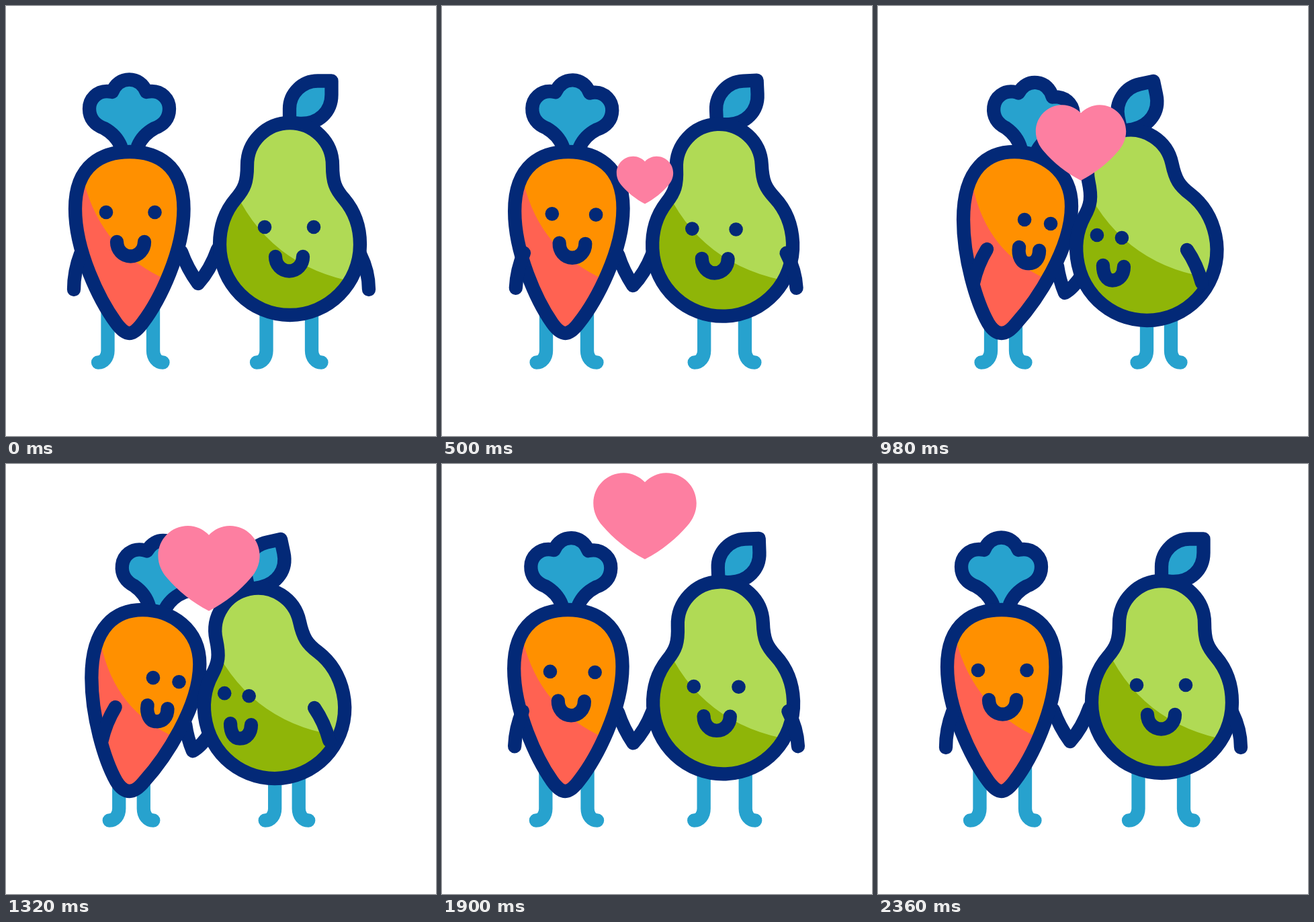
Write an HTML page with a canvas that moves like this. It is 640 by 640 pixels and loops after 2400 ms.

```html
<!DOCTYPE html>
<html lang="en">
<head>
<meta charset="utf-8">
<title>Carrot and pear</title>
<style>
  html, body { margin: 0; height: 100%; overflow: hidden; background: #fff; }
  canvas { display: block; width: 100vw; height: 100vh; }
</style>
</head>
<body>
<canvas width="640" height="640"></canvas>
<script>
const ctx = document.querySelector('canvas').getContext('2d');
const LOOP = 2400;
const NAVY = '#032977', BLUE = '#27a2ce', PINK = '#fd7fa1';
const ORANGE = '#ff9000', RED = '#ff6252', LIME = '#b0da55', GREEN = '#8fb508';

const CARROT = [
  'M184 217C223 217 264.5 235 264.5 302C264.5 365 229 438 203 472Q192 487 183.5 487Q175 487 164 472C139 438 103 365 103 302C103 235 145 217 184 217Z',
  'M203 217C245 217 288 245 288 298C288 362 235 440 206 472Q194 487 184 487Q173 487 164 472C146 440 127 375 127 318C127 240 165 217 203 217Z'];
const CARROT_SHADE = [
  'M116 262Q143 365 240 408L240 520L60 520L60 262Z',
  'M141 268Q162 368 252 407L252 520L60 520L60 268Z'];
const CARROT_MOUTH = [
  'M165 351C165 363 174 372.5 185.5 372.5C197 372.5 206 363 206 351',
  'M210 359C208 371 213 383 223 383C233 384 240 376 240 364'];
const CARROT_ARM = ['M111 369Q101 395 101 422', 'M162 362Q148 385 142 412'];
const CARROT_LEAF = 'M171 209C166 197 157 188 146 182C132 177 124 167 124 153C124 138 136 127 150 127Q154 127 158 128C163 116 172 109.5 183.5 109.5C195 109.5 204 116 209 128Q213 127 217 127C231 127 243 138 243 153C243 167 235 177 221 182C210 188 201 197 196 209';

// The pear is drawn around the centre of its belly.
const PEAR = 'M0 -181C35 -181 63.5 -153 63.5 -118C63.5 -93 67.5 -83 80.5 -68C97.5 -48 104.5 -25 104.5 0C104.5 58 57.5 105 0 105C-57.5 105 -104.5 58 -104.5 0C-104.5 -25 -97.5 -48 -80.5 -68C-67.5 -83 -63.5 -93 -63.5 -118C-63.5 -153 -35 -181 0 -181Z';
const PEAR_LEAF = 'M-.5 -180V-202C-.5 -225 18.5 -243.5 41.5 -243.5H62V-223C62 -197 42.5 -180 17.5 -180Z';
const PEAR_SHADE = 'M-87.5 -93Q-35.5 33 102.5 57V165H-142.5V-93Z';
const PEAR_MOUTH = [
  'M401 373C401 385 410 394.5 421.5 394.5C433 394.5 442 385 442 373',
  'M335 386C335 399 340 408.5 349 408.5C359 408.5 366 400 366 388'];
const PEAR_ARM = ['M527 369Q540 395 540 422', 'M460 363Q475 385 482 412'];

const HANDS = [
  'M261 366Q270 391 286 413Q304 393 315 362',
  'M267 387Q270 408 278 427Q291 420 305 398'];
const HEART = 'M0 -52.5C-8 -61 -20 -67 -33 -67C-59 -67 -80 -46 -80 -20C-80 -6 -74 6 -66 15C-50 34 -26 54 0 67C26 54 50 34 66 15C74 6 80 -6 80 -20C80 -46 59 -67 33 -67C20 -67 8 -61 0 -52.5Z';

// cubic-bezier(.8, 0, .2, 1)
function ease(x) {
  if (x <= 0) return 0;
  if (x >= 1) return 1;
  let low = 0, high = 1, s;
  for (let i = 0; i < 24; i++) {
    s = (low + high) / 2;
    const q = 1 - s;
    if (2.4 * s * q * q + 0.6 * s * s * q + s ** 3 < x) low = s; else high = s;
  }
  return s * s * (3 - 2 * s);
}

function morph([from, to], k) {
  const number = /-?[\d.]+/g, ends = to.match(number);
  let i = 0;
  return new Path2D(from.replace(number, v => +v + (ends[i++] - v) * k));
}

function place(d, x, y, degrees = 0, scale = 1) {
  const path = new Path2D();
  path.addPath(new Path2D(d), new DOMMatrix().translate(x, y).rotate(degrees).scale(scale));
  return path;
}

function fill(path, color) {
  ctx.fillStyle = color;
  ctx.fill(path);
}

function line(path, color = NAVY) {
  ctx.strokeStyle = color;
  ctx.stroke(path);
}

function leg(x, side) {
  line(new Path2D(`M${x} 440V513C${x} 523 ${x + side * 6} 530.5 ${x + side * 14.5} 530.5`), BLUE);
}

function leaf(path) {
  fill(path, BLUE);
  line(path);
}

function body(path, light, dark, shade) {
  fill(path, light);
  ctx.save();
  ctx.clip(path);
  fill(shade, dark);
  ctx.restore();
  line(path);
}

function eye(x, y) {
  const dot = new Path2D();
  dot.arc(x, y, 10.3, 0, Math.PI * 2);
  fill(dot, NAVY);
}

function drawHeart(t) {
  const scale = 0.84 * ease((t - 290) / 400) + 0.16 * ease((t - 1000) / 600) - ease((t - 1760) / 600);
  if (scale <= 0.004) return;
  const u = (t - 280) / 2080;
  const y = 280.5 - 250 * u + 8.4 * Math.sin(2 * Math.PI * u);
  fill(place(HEART, 302, y, 0, scale), PINK);
}

function draw(t) {
  const k = 1.022 * ease(1 - Math.abs(t - 1187) / 1172);
  ctx.fillStyle = '#fff';
  ctx.fillRect(0, 0, 640, 640);
  ctx.lineWidth = 20.3;
  ctx.lineCap = ctx.lineJoin = 'round';

  leg(151.5 + 16.5 * k, -1);
  leg(219 - 14 * k, 1);
  leg(387.5 + 12.5 * k, -1);
  leg(455 - 19 * k, 1);
  line(morph(HANDS, k));

  const sway = new DOMMatrix().translate(184 + 41.5 * k, 207 + 4 * k).rotate(6.8 * k).translate(-184, -207);
  const carrotLeaf = new Path2D();
  carrotLeaf.addPath(new Path2D(CARROT_LEAF), sway);
  leaf(carrotLeaf);
  body(morph(CARROT, k), ORANGE, RED, morph(CARROT_SHADE, k));
  eye(149 + 69 * k, 307 + 11 * k);
  eye(221.5 + 35.5 * k, 307 + 17 * k);
  line(morph(CARROT_MOUTH, k));
  line(morph(CARROT_ARM, k));

  const pose = [422.5 - 22.5 * k, 355 + 8 * k, -12 * k];
  leaf(place(PEAR_LEAF, ...pose));
  body(place(PEAR, ...pose), LIME, GREEN, place(PEAR_SHADE, 422.5 - 19 * k, 355 + 2 * k, -4.2 * k));
  eye(385 - 59 * k, 329 + 12 * k);
  eye(458 - 95 * k, 329 + 16 * k);
  line(morph(PEAR_MOUTH, k));
  line(morph(PEAR_ARM, k));

  drawHeart(t);
}

function tick() {
  draw(performance.now() % LOOP);
  requestAnimationFrame(tick);
}
tick();
</script>
</body>
</html>
```
